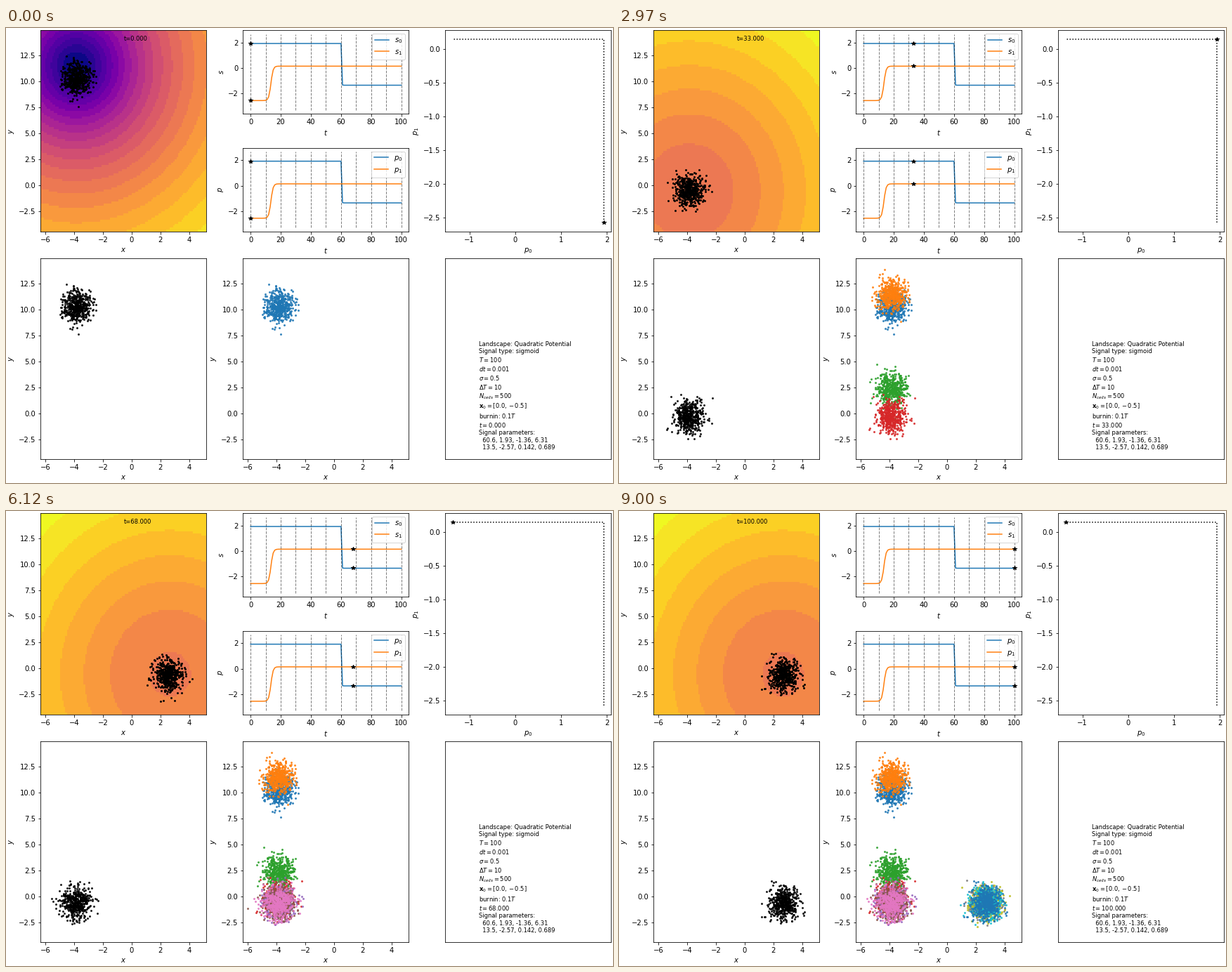
Write a matplotlib script that moves like this. It is 864 by 648 pixels and loops after 9.09 s.

```python
import matplotlib.pyplot as plt
import numpy as np
from matplotlib.animation import FuncAnimation

W, H = 864, 648
T = 100
N_CELLS = 500
SIGMA = 0.5
SNAP_STEP = 10
XLIM, YLIM = (-6.32, 5.2), (-4.45, 14.93)
CURVATURE = np.array([1 / 4, 1 / 9])
SIGNALS = [(60.6, 1.93, -1.36, 6.31), (13.5, -2.57, 0.142, 0.689)]
BANDS, BAND_STEP = 22, 0.1935


def params(t):
    """Sigmoidal signals at time t."""
    return np.array([a + (b - a) * 0.5 * (1 + np.tanh(r * (t - tc)))
                     for tc, a, b, r in SIGNALS])


def simulate(substeps=20, burnin=T // 10):
    """Langevin cells in the moving potential, one snapshot per unit time."""
    rng = np.random.default_rng(7)
    dt = 1 / substeps
    cells = np.tile([0.0, -0.5], (N_CELLS, 1))
    history = []
    for unit in range(-burnin, T + 1):
        if unit >= 0:
            history.append(cells.copy())
        for k in range(substeps):
            p = params(max(0, unit + k * dt))
            noise = rng.normal(size=cells.shape) * SIGMA * np.sqrt(dt)
            cells = cells - (2 * CURVATURE * cells + p) * dt + noise
    return history


times = np.arange(T + 1)
curves = params(times)
history = simulate()

gx, gy = np.meshgrid(np.linspace(*XLIM, 100), np.linspace(*YLIM, 100))
bowl = CURVATURE[0] * gx**2 + CURVATURE[1] * gy**2
floor = -np.sum(curves[:, 0]**2 / (4 * CURVATURE))


def landscape(t):
    """Banded log height of the potential above its lowest value."""
    p = curves[:, t]
    height = np.maximum(bowl + p[0] * gx + p[1] * gy - floor, 0)
    return np.floor(np.log1p(height) / BAND_STEP)


def info(t):
    rows = ["Landscape: Quadratic Potential", "Signal type: sigmoid",
            "$T=100$", "$dt=0.001$", r"$\sigma=0.5$", r"$\Delta T=10$",
            "$N_{cells}=500$", r"$\mathbf{x}_0=[0.0, -0.5]$",
            "burnin: $0.1T$", f"$t={t:.3f}$", "Signal parameters:"]
    rows += ["  " + ", ".join(f"{v:.3g}" for v in s) for s in SIGNALS]
    return "\n".join(rows)


fig = plt.figure(figsize=(W / 72, H / 72), dpi=72)


def panel(left, top, height, xlabel="", ylabel=""):
    ax = fig.add_axes([left / W, 1 - (top + height) / H, 236 / W, height / H])
    ax.set_xlabel(xlabel)
    ax.set_ylabel(ylabel)
    return ax


def plane(left, top):
    ax = panel(left, top, 286.6, "$x$", "$y$")
    ax.set(xlim=XLIM, ylim=YLIM)
    return ax


def dots(ax, color, alpha):
    return ax.plot([], [], ".", color=color, ms=4, alpha=alpha)[0]


def signal_panel(top, name):
    ax = panel(337.4, top, 119, "$t$", f"${name}$")
    for i, curve in enumerate(curves):
        ax.plot(times, curve, label=f"${name}_{i}$")
    mid = (curves.max() + curves.min()) / 2
    half = np.ptp(curves) / 2 * 1.1**3
    ax.vlines(np.arange(0, T + 1, SNAP_STEP), mid - half, mid + half,
              colors="k", linestyles="--", linewidth=1, alpha=0.5)
    ax.set(xlim=(-5, 105), ylim=(mid - half * 1.1, mid + half * 1.1))
    ax.legend(loc="upper right")
    return ax.plot([], [], "k*", zorder=3)[0]


COL1, COL2, COL3 = 49.4, 337.4, 625.4
TOP, BOTTOM = 3.2, 327.8

ax_land = plane(COL1, TOP)
image = ax_land.imshow(landscape(0), origin="lower", aspect="auto",
                       extent=(*XLIM, *YLIM), interpolation="nearest",
                       cmap=plt.get_cmap("plasma", BANDS),
                       vmin=-0.5, vmax=BANDS - 0.5)
live = dots(ax_land, "k", 0.9)
clock = ax_land.text(0.5, 0.95, "", fontsize="small",
                     transform=ax_land.transAxes)

stars = [signal_panel(TOP, "s"), signal_panel(170.8, "p")]

ax_phase = panel(COL3, TOP, 286.6, "$p_0$", "$p_1$")
ax_phase.plot(*curves, "k:")
phase_star = ax_phase.plot(*curves[:, :1], "k*")[0]

latest = dots(plane(COL1, BOTTOM), "k", 0.8)

ax_all = plane(COL2, BOTTOM)
snaps = [dots(ax_all, f"C{i % 10}", 0.8) for i in range(T // SNAP_STEP + 1)]

ax_info = panel(COL3, BOTTOM, 286.6)
ax_info.set(xticks=[], yticks=[])
note = ax_info.text(0.2, 0.05, "", fontsize="small",
                    transform=ax_info.transAxes)


def update(t):
    image.set_data(landscape(t))
    live.set_data(*history[t].T)
    clock.set_text(f"t={t:.3f}")
    for star in stars:
        star.set_data([t, t], curves[:, t])
    phase_star.set_data(*curves[:, t:t + 1])
    last = t // SNAP_STEP
    latest.set_data(*history[last * SNAP_STEP].T)
    for i, snap in enumerate(snaps):
        snap.set_data(*(history[i * SNAP_STEP].T if i <= last else ([], [])))
    note.set_text(info(t))
    return []


anim = FuncAnimation(fig, update, frames=T + 1, interval=90,
                     init_func=lambda: update(0), repeat=True, repeat_delay=0)
plt.show()
```
